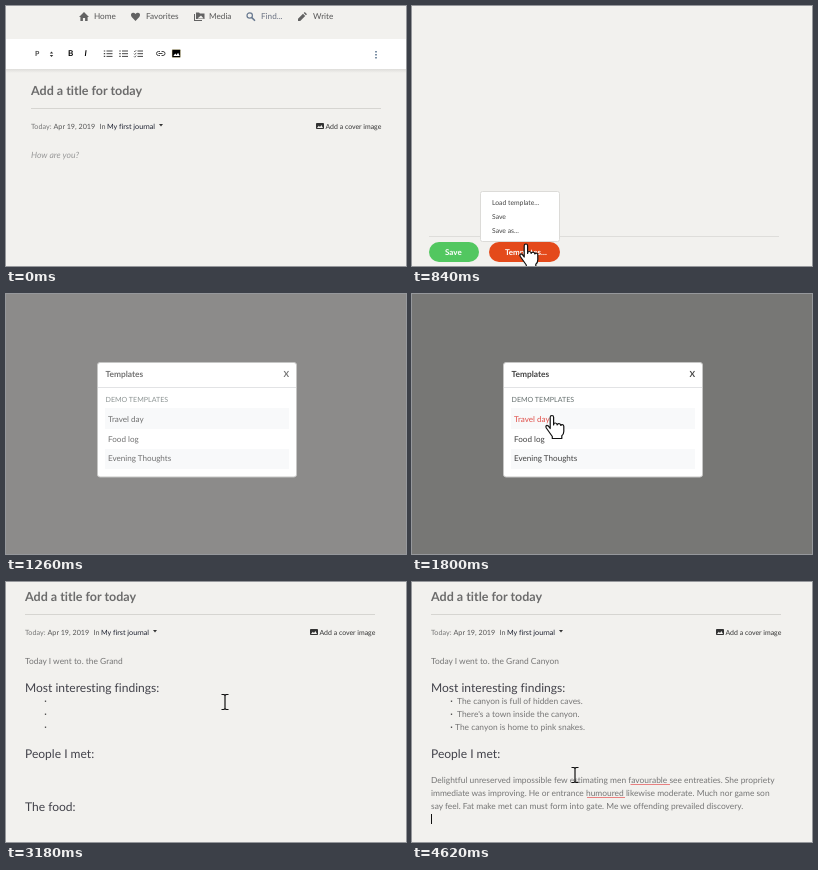
Recreate the animation shown at these times as an HTML page. Size 400x260 px, loop 4680 ms.

```html
<!DOCTYPE html>
<html lang="en">
<head>
<meta charset="utf-8">
<title>Journal templates</title>
<style>
  html, body { margin: 0; height: 100%; overflow: hidden; background: #f2f1ee; }
  svg { display: block; width: 100vw; height: 100vh; }
  text { font-family: Lato, sans-serif; font-variant-ligatures: none; text-rendering: geometricPrecision; fill: #444; white-space: pre; }
  .nav text { font-size: 8.2px; fill: #555; }
  .title { font-size: 12.5px; font-weight: bold; fill: #6c6c6c; }
  .meta text { font-size: 7.2px; fill: #555; }
  .meta .cover { font-size: 6.95px; fill: #333; }
  .head text { font-size: 12.05px; fill: #42424a; }
  .body text { font-size: 8.42px; fill: #767676; }
  .menu text { font-size: 6.8px; }
  .button { font-size: 8px; font-weight: bold; fill: #fff; }
  .modal text { font-size: 8.1px; }
  .modal .heading { font-size: 8.4px; font-weight: bold; }
  .modal .small { font-size: 7.1px; fill: #66706f; }
  .line { fill: none; stroke: #444; }
</style>
</head>
<body>
<svg viewBox="0 0 400 260">
  <defs>
    <linearGradient id="shade" x2="0" y2="1">
      <stop stop-color="#dedddA"/><stop offset="1" stop-color="#f2f1ee"/>
    </linearGradient>
    <g id="picture">
      <rect width="8" height="6" rx=".8" fill="#333"/>
      <path d="M1 5l1.8-2.2 1.2 1.2 1.4-2L7 5z" fill="#f2f1ee"/>
    </g>
    <g id="pageTop">
      <text class="title" x="25" y="89">Add a title for today</text>
      <path d="M25 102.5H375" stroke="#d6d5d1"/>
      <g class="meta">
        <text x="25" y="123" style="fill:#777">Today:</text>
        <text x="47.5" y="123">Apr 19, 2019</text>
        <text x="93.5" y="123">In</text>
        <text x="101" y="123" style="fill:#1c2030">My first journal</text>
        <path d="M153 118h4l-2 2.4z" fill="#333"/>
        <use href="#picture" x="310" y="117"/>
        <text class="cover" x="319.5" y="123">Add a cover image</text>
      </g>
    </g>
  </defs>

  <rect width="400" height="260" fill="#f2f1ee"/>
  <g class="nav">
    <g fill="#626262">
      <path d="M73 11l5-5 5 5h-1.4v4h-2.5v-3h-2.2v3h-2.5v-4z"/>
      <path d="M129.5 15l-3.8-4q-1.6-2.5.3-4 2-1 3.5 1 1.5-2 3.5-1 1.9 1.5.3 4z"/>
      <path d="M188 8v7h8v-1h-7V8zM190 6.5h3l1 1h4.5V13H190z"/>
      <path d="M292 15v-2.2l5-5 2.2 2.2-5 5zM297.7 7.1l1.1-1.1 2.2 2.2-1.1 1.1z"/>
    </g>
    <path d="M195 9.500l-3.500 3h6.200z" fill="#f2f1ee"/>
    <circle cx="243.7" cy="9.5" r="2.7" class="line" style="stroke:#687990" stroke-width="1.2"/>
    <path d="M245.8 11.6l3.2 3.2" stroke="#687990" stroke-width="1.5"/>
    <text x="88" y="13">Home</text>
    <text x="140" y="13">Favorites</text>
    <text x="203" y="13">Media</text>
    <text x="255" y="13" style="fill:#687080">Find...</text>
    <text x="307" y="13">Write</text>
  </g>
  <rect y="63" width="400" height="4" fill="url(#shade)"/>
  <rect y="33" width="400" height="30" fill="#fff"/>
  <g font-weight="bold" font-size="8">
    <text x="29" y="50" font-size="7">P</text>
    <text x="62" y="50" style="fill:#000">B</text>
    <text x="78.5" y="50" style="fill:#000" font-style="italic">I</text>
  </g>
  <path d="M43.8 47.5l1.7-2 1.7 2zM43.8 49l1.7 2 1.7-2z" fill="#333"/>
  <path class="line" d="M100.5 45h6m-6 2.7h6m-6 2.7h6M116 45h6m-6 2.7h6m-6 2.7h6M131.5 45h5.5m-5.5 2.7h5.5m-5.5 2.7h5.5"/>
  <path class="line" stroke-dasharray="1.2 1.5" stroke-width="1.4" d="M98.5 44.4v7M114 44.4v7"/>
  <path class="line" stroke-width=".8" d="M128 45l.8.8 1.4-1.6M128 47.7l.8.8 1.4-1.6M128 50.4l.8.8 1.4-1.6"/>
  <path class="line" d="M154 45.5h-1.5a2 2 0 0 0 0 4h1.5m1.5-4h1.5a2 2 0 0 1 0 4h-1.5m-3-2h4"/>
  <rect x="166" y="43.5" width="8.5" height="8" rx=".8" fill="#000" stroke="#e9dfb0" stroke-width=".5"/>
  <path d="M167.3 50l1.9-2.5 1.3 1.5 1.6-2.2 1.6 3.2z" fill="#fff"/>
  <path d="M370 45v8" stroke="#5c7590" stroke-width="1.6" stroke-dasharray="1.6 1.4"/>
  <use href="#pageTop"/>
  <text x="25" y="152" font-size="8.6" font-style="italic" style="fill:#999">How are you?</text>

  <g id="footer">
    <rect width="400" height="260" fill="#f2f1ee"/>
    <g id="controls">
      <path d="M17 230.5H367" stroke="#dedddA"/>
      <rect x="17" y="236" width="50" height="20" rx="10" fill="#52c760"/>
      <text class="button" x="33" y="249">Save</text>
      <rect x="77" y="236" width="71" height="20" rx="10" fill="#e44a1b"/>
      <text class="button" x="93" y="249">Templates...</text>
      <g id="menu" class="menu">
        <rect x="68.5" y="185.5" width="79" height="50" rx="2" fill="#fff" stroke="#dcdbd8"/>
        <text x="80" y="199">Load template...</text>
        <text x="80" y="213">Save</text>
        <text x="80" y="227">Save as...</text>
      </g>
    </g>
  </g>

  <rect id="backdrop" width="400" height="260"/>
  <g id="modal" class="modal">
    <rect x="91.5" y="68.5" width="199" height="114.5" rx="2.5" fill="#fff" stroke="#c6c6c5"/>
    <path d="M92 93.5H290" stroke="#e2e3e5"/>
    <path d="M99 114h184v21H99zM99 155h184v20H99z" fill="#f8f9fa"/>
    <g id="labels">
      <text class="heading" x="99.5" y="83">Templates</text>
      <text class="heading" x="277.5" y="83">X</text>
      <text class="small" x="99.5" y="108">DEMO TEMPLATES</text>
      <text id="choice" x="102" y="127.5">Travel day</text>
      <text x="102" y="147.5">Food log</text>
      <text x="102" y="167">Evening Thoughts</text>
    </g>
  </g>

  <g id="editor">
    <rect width="400" height="260" fill="#f2f1ee"/>
    <use href="#pageTop" x="-6" y="-70"/>
    <g class="head">
      <text x="19" y="110">Most interesting findings:</text>
      <text x="19" y="176">People I met:</text>
      <text id="food" x="19" y="229">The food:</text>
    </g>
    <path d="M39.5 118.5v1.5m0 11.5v1.5m0 11.5v1.5" stroke="#555" stroke-width="1.3"/>
    <g id="typed" class="body"></g>
    <path id="typo1" d="M218.5 202.5h39.500" stroke="#e88080"/>
    <path id="typo2" d="M175 215.5h38" stroke="#e88080"/>
    <rect id="caret" width="1" height="10" fill="#111"/>
  </g>

  <path id="beam" fill="none" stroke="#111" stroke-width="1.2"
    d="M-3.5-7.5h2.5l1 1 1-1h2.5M0-6.5v13M-3.5 7.5h2.5l1-1 1 1h2.5"/>
  <path id="hand" fill="#fff" stroke="#111" stroke-width="1.2" stroke-linejoin="round"
    d="M-1.8 13V1.7a1.7 1.7 0 0 1 3.4 0V9.5q0-2 1.7-2t1.9 2q.2-1.4 1.8-1.3t1.8 1.8q.3-1.1 1.6-.9t1.4 1.7v5q0 3-2 4.5v2.7h-9.5v-2l-6-8.5q-1-2.2.6-2.6 1.3-.2 3.3 3.1z"/>
</svg>
<script>
const LOOP = 4680, STEP = 60;
const $ = id => document.getElementById(id);

const lines = [
  [19, 82, "Today I went to. the Grand Canyon"],
  [45, 122, "The canyon is full of hidden caves."],
  [45, 135, "There's a town inside the canyon."],
  [43, 148, "The canyon is home to pink snakes."],
  [19, 201, "Delightful unreserved impossible few estimating men favourable see entreaties. She propriety"],
  [19, 214, "immediate was improving. He or entrance humoured likewise moderate. Much nor game son"],
  [19, 227, "say feel. Fat make met can must form into gate. Me we offending prevailed discovery."],
  [19, 240, ""]
].map(([x, y, text]) => {
  const el = document.createElementNS("http://www.w3.org/2000/svg", "text");
  el.setAttribute("x", x);
  el.setAttribute("y", y);
  $("typed").append(el);
  return { x, y, text, el };
});

// Linear interpolation through [time, value] pairs
function track(t, ...keys) {
  if (t <= keys[0][0]) return keys[0][1];
  for (let i = 1; i < keys.length; i++) {
    const [t0, a] = keys[i - 1], [t1, b] = keys[i];
    if (t < t1) return a + (b - a) * (t - t0) / (t1 - t0);
  }
  return keys[keys.length - 1][1];
}
const fade = (id, value) => $(id).setAttribute("opacity", Number(value));
const place = (id, x, y) => $(id).setAttribute("transform", `translate(${x} ${y})`);

function type(t) {
  const count = Math.floor(track(t, [2460, 16], [2700, 20], [3180, 26], [3240, 28], [3540, 33],
    [3780, 33], [4170, 135], [4320, 197], [4590, 420]));
  let start = 0, current = 0;
  lines.forEach(({ text, el }, i) => {
    el.textContent = text.slice(0, Math.max(0, count - start));
    if (count > start) current = i;
    start += text.length;
  });
  const { x, y, el } = lines[current];
  place("caret", x + (el.textContent ? el.getComputedTextLength() + 1 : 0), y - 8);
  fade("caret", Math.floor(t / 540) % 2 === 0);
  place("food", 0, 13.3 * Math.max(0, current - 4));
  fade("typo1", lines[4].el.textContent.includes("favourable"));
  fade("typo2", lines[5].el.textContent.includes("humoured"));
}

function draw(t) {
  fade("footer", track(t, [0, 0], [540, 1]));
  fade("menu", track(t, [660, 0], [780, 1]));
  fade("controls", track(t, [1080, 1], [1260, 0]));
  fade("backdrop", track(t, [1080, 0], [1260, .425], [1500, .505]));
  fade("modal", track(t, [1080, 0], [1260, 1]));
  fade("labels", track(t, [1080, 0], [1260, .75], [1440, 1]));
  $("choice").style.fill = t >= 1710 ? "#e0524c" : "";
  fade("editor", track(t, [1860, 0], [2160, 1]));

  fade("hand", (t > 540 && t < 1140) || (t > 1440 && t < 2040));
  place("hand",
    track(t, [540, 126], [780, 114], [900, 114], [1080, 108], [1480, 175], [1740, 140]),
    track(t, [540, 262], [780, 238], [900, 238], [1080, 197], [1480, 190], [1740, 121.5]));
  fade("beam", t >= 2100);
  place("beam",
    track(t, [2340, 174], [2640, 219], [3480, 219], [3720, 165], [4320, 163]),
    track(t, [2340, 75], [2640, 120], [3480, 120], [3720, 138], [4020, 138], [4320, 204], [4560, 193]));
  type(t);
}

const begin = performance.now();
function tick() {
  const t = (performance.now() - begin) % LOOP;
  draw(Math.floor(t / STEP) * STEP);
  requestAnimationFrame(tick);
}
tick();
</script>
</body>
</html>
```
